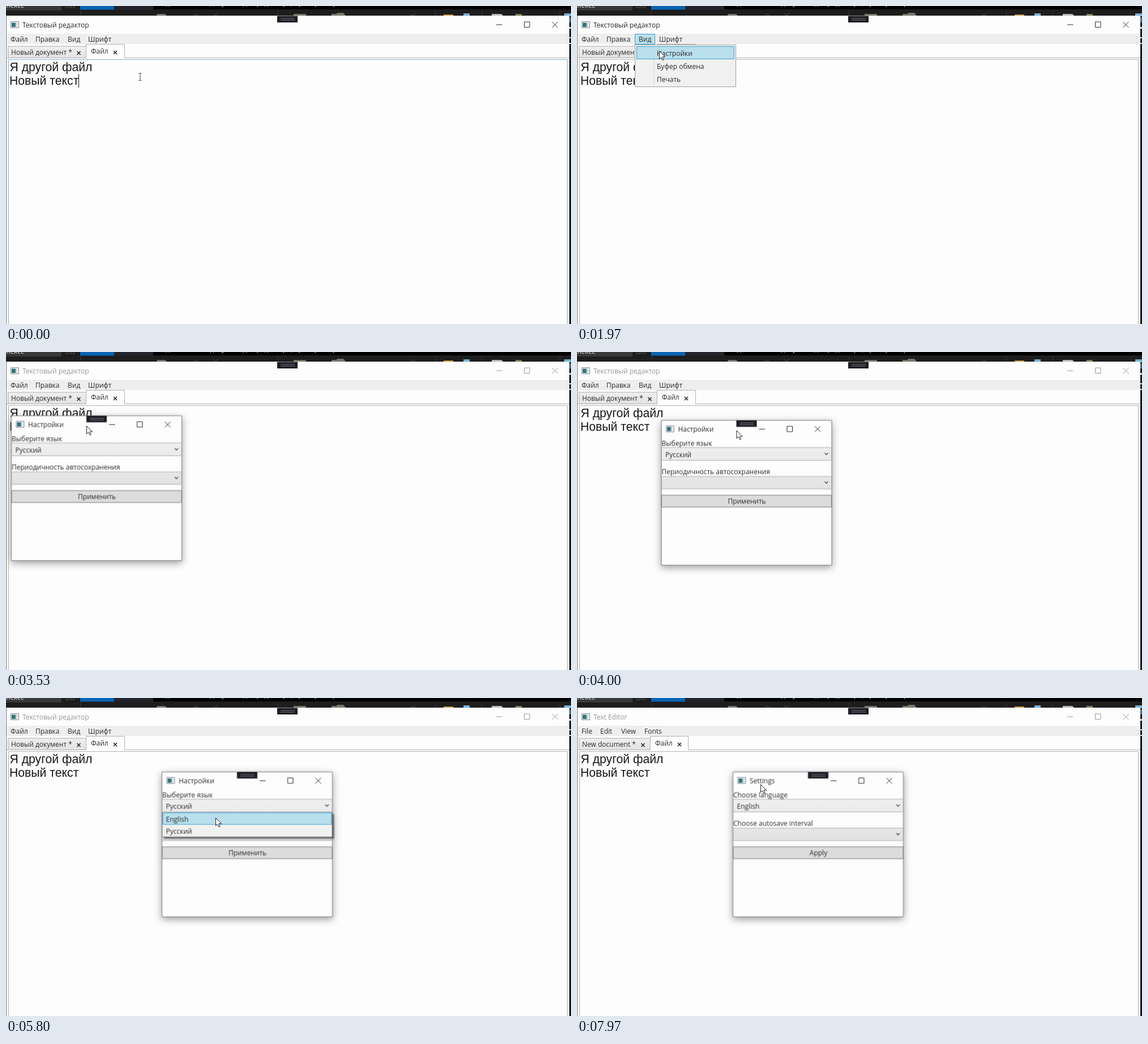
An HTML page that plays this animation: 998 px wide and 561 px high, repeating every 8000 ms.

```html
<!DOCTYPE html>
<html lang="ru">
<head>
<meta charset="utf-8">
<title>Текстовый редактор</title>
<style>
html, body { margin: 0; width: 100%; height: 100%; overflow: hidden; background: #1d1d1d; }
svg { display: block; width: 100vw; height: 100vh; }
text { font: 12px "Open Sans", "Noto Sans", sans-serif; fill: #2b2b2b; white-space: pre; }
.body text { font: 21.2px "Liberation Sans", Arial, sans-serif; fill: #181818; }
.line { fill: none; stroke: currentColor; }
.title text { fill: currentColor; }
.box { fill: url(#face); stroke: #acacb4; }
.hot { fill: #b9dfec; stroke: #3ba3cf; }

/* Switches: 1% = 80 ms */
.t { animation: 8s step-end infinite; }
@keyframes caret { 0% { opacity: 1 } 6.6% { opacity: 0 } 13.2% { opacity: 1 } 18.5% { opacity: 0 } }
@keyframes focus { 0% { stroke: #7db3dc } 18.5% { stroke: #b4b4a6 } }
@keyframes active { 0% { color: #2b2b2b } 32.5% { color: #989898 } }
@keyframes beam { 0% { opacity: 1 } 9.4% { opacity: 0 } }
@keyframes arrow { 0% { opacity: 0 } 9.4% { opacity: 1 } }
@keyframes menu { 0% { opacity: 0 } 18.5% { opacity: 1 } 31.8% { opacity: 0 } }
@keyframes menuItem { 0% { opacity: 0 } 22% { opacity: 1 } }
@keyframes grip { 0% { opacity: 0 } 36.3% { opacity: 1 } }
@keyframes comboHover { 0% { opacity: 0 } 61.8% { opacity: 1 } 69% { opacity: 0 } }
@keyframes popup { 0% { opacity: 0 } 62.6% { opacity: 1 } 76.6% { opacity: 0 } }
@keyframes choice { 0% { transform: translateY(21px) } 69% { transform: none } }
@keyframes before { 0% { opacity: 1 } 76.6% { opacity: 0 } }
@keyframes after { 0% { opacity: 0 } 76.6% { opacity: 1 } }
@keyframes applyHover { 0% { opacity: 0 } 84.3% { opacity: 1 } 98.4% { opacity: 0 } }
@keyframes ru { 0% { opacity: 1 } 88.6% { opacity: 0 } }
@keyframes en { 0% { opacity: 0 } 88.6% { opacity: 1 } }

/* Motion */
#pointer { animation: pointer 8s ease-in-out infinite; }
@keyframes pointer {
  0%, 3.75% { transform: translate(237px, 125px) }
  15%, 18.75% { transform: translate(125px, 60px) }
  23.75%, 42.1% { transform: translate(145px, 79px) }
  44.1% { transform: translate(142px, 130px) }
  47.5% { transform: translate(142px, 130px); animation-timing-function: ease-in }
  50% { transform: translate(281px, 138px); animation-timing-function: ease-out }
  55.6%, 58.1% { transform: translate(408px, 148px) }
  62.5%, 68.4% { transform: translate(374px, 200px) }
  72.3%, 80.9% { transform: translate(370px, 211px) }
  85.6%, 97.6% { transform: translate(368px, 269px) }
  99.5%, 100% { transform: translate(324px, 152px) }
}
#dialog { animation: drag 8s infinite, appear 8s linear infinite; filter: drop-shadow(0 4px 7px rgba(0, 0, 0, .38)); }
@keyframes drag {
  0%, 47.5% { transform: translate(9.5px, 112.5px); animation-timing-function: ease-in }
  50% { transform: translate(148.5px, 120.5px); animation-timing-function: ease-out }
  55.6%, 100% { transform: translate(275.5px, 130.5px) }
}
@keyframes appear { 0%, 32.5% { opacity: 0 } 35.6%, 100% { opacity: 1 } }
#list { animation: slide 8s ease-out infinite; filter: drop-shadow(3px 3px 1px rgba(30, 30, 40, .6)); }
@keyframes slide { 0%, 62.7% { transform: translateY(-44px) } 64.8%, 100% { transform: none } }
</style>
</head>
<body>
<svg viewBox="0 0 998 561" preserveAspectRatio="none">
  <defs>
    <linearGradient id="face" x2="0" y2="1"><stop stop-color="#efefef"/><stop offset="1" stop-color="#e3e3e4"/></linearGradient>
    <linearGradient id="faceHot" x2="0" y2="1"><stop stop-color="#ebf4fc"/><stop offset="1" stop-color="#d9ebfb"/></linearGradient>
    <clipPath id="below"><path d="M-4 71h320v60h-320z"/></clipPath>
    <path id="controls" class="line" d="M0 5.5h10.5M49.5 .5h9.5v9.5h-9.5zM98.5 .5l10 10m0-10l-10 10"/>
    <path id="chevron" d="M-3 -1.5l3 3l3-3" fill="none" stroke="#444" stroke-width="1.3"/>
    <path id="cross" d="M-3 -3l6 6m0-6l-6 6" stroke="#222" stroke-width="1.5"/>
    <g id="icon">
      <path d="M.5 .5h14v11h-14z" fill="#e4e8ea" stroke="#8c929c"/>
      <path d="M2 2.5h6v7.500h-6z" fill="#2f756f"/>
      <path d="M8 2.500h2v7.500h-2z" fill="#79a9c0"/>
    </g>
    <g id="handle">
      <path d="M0 0h36v11.500h-36z" fill="#1c1c22"/>
      <path d="M6 4.500h25M6 7.500h25" stroke="#777780"/>
    </g>
  </defs>

  <!-- Desktop behind the window -->
  <path d="M0 0h998v561h-998z" fill="#1d1d1d"/>
  <path d="M0 0h98v8h-98z" fill="#383838"/>
  <path d="M131 0h60v6.500h-60z" fill="#0864b4"/>
  <path d="M191 0h69v6.500h-69z" fill="#23242b"/>
  <path d="M260 0h738v6h-738z" fill="#000"/>
  <path d="M105.500 0v3h6v-3m3 0v3h6v-3" class="line" color="#555"/>
  <path d="M131.500 7v10M480.500 9v8M758.500 9v8M840.500 9v8M978.500 9v8" stroke="#444" stroke-dasharray="2 1"/>
  <text x="-7" y="3" style="fill:#e8e8e8">плексе</text>
  <text x="262" y="-1" style="fill:#d0d0d0">Создайте новый документ для редактора, проверьте файл</text>
  <path d="M267 14h14l3 3h-18zM508 14h22v3h-22zM575 14h8l3-2h10l4 5h-25z" fill="#77776c"/>
  <path d="M332 17l4-3 4 3M366 13l4 4 4-4M714 14l4 3 5-3" class="line" color="#554f66"/>
  <path d="M773 15h17v2h-17z" fill="#c99a45"/>
  <path d="M808 13h11v4h-11zM986 13h12v5h-12z" fill="#79b3d8"/>
  <path d="M858 14h17l3 3h-20z" fill="#bdbdbd"/>
  <path d="M900 14h11v3h-11z" fill="#87805a"/>

  <!-- Editor window -->
  <path d="M0 17h995.500v544h-995.500z" fill="#fdfdfd"/>
  <path d="M0 49h995v18h-995z" fill="#eeeeef"/>
  <path d="M.5 17v544" stroke="#7c7c7c"/>
  <path d="M995 18h3v543h-3z" fill="#16161a"/>
  <path d="M995 37h3v3h-3zM995 55h3v2h-3zM995 65h3v2h-3z" fill="#ddd"/>
  <path d="M995 20h3v9h-3z" fill="#456c8b"/>
  <use href="#icon" x="8" y="27"/>
  <use href="#handle" x="479" y="17.500"/>
  <g class="t title" style="animation-name:active">
    <use href="#controls" x="866" y="27.500"/>
    <text class="t" style="animation-name:ru" x="29" y="38">Текстовый редактор</text>
    <text class="t" style="animation-name:en" x="29" y="38">Text Editor</text>
  </g>
  <path d="M1 91.500h994" stroke="#b4b4b4"/>
  <g class="t" style="animation-name:menu"><path class="hot" d="M102.500 49.500h35v18h-35z"/></g>
  <g class="t" style="animation-name:ru">
    <text x="8" y="63">Файл</text><text x="52" y="63">Правка</text><text x="109" y="63">Вид</text><text x="145" y="63">Шрифт</text>
    <path class="box" d="M3.500 91.500v-20.500h138v20.500z"/>
    <path d="M141.500 92v-24.500h68v24.500" fill="#fdfdfd" stroke="#b4b4b4"/>
    <text x="9" y="86">Новый документ *</text><text x="150" y="84">Файл</text>
    <use href="#cross" x="128.500" y="83"/><use href="#cross" x="193" y="82"/>
  </g>
  <g class="t" style="animation-name:en">
    <text x="8" y="63">File</text><text x="41" y="63">Edit</text><text x="78" y="63">View</text><text x="119" y="63">Fonts</text>
    <path class="box" d="M3.500 91.500v-20.500h126v20.500z"/>
    <path d="M129.500 92v-24.500h67v24.500" fill="#fdfdfd" stroke="#b4b4b4"/>
    <text x="9" y="86">New document *</text><text x="138" y="84">Файл</text>
    <use href="#cross" x="116.500" y="83"/><use href="#cross" x="181" y="82"/>
  </g>
  <path class="t" style="animation-name:focus" d="M4.500 562v-467.500h987v467.500" fill="none"/>
  <g class="body">
    <text x="6.500" y="115">Я другой файл</text>
    <text x="6" y="139">Новый текст</text>
    <path class="t" style="animation-name:caret" d="M128.500 120v24" stroke="#111"/>
  </g>

  <!-- View menu -->
  <g class="t" style="animation-name:menu">
    <path d="M102.500 68.500h178v74h-178z" fill="#f0f0f0" stroke="#a0a0a0"/>
    <path d="M135.500 70v71" stroke="#d9d9d9"/>
    <path class="t hot" style="animation-name:menuItem" d="M105.500 71.500h172v22h-172z"/>
    <text x="141" y="87.500">Настройки</text><text x="141" y="110.500">Буфер обмена</text><text x="141" y="133.500">Печать</text>
  </g>

  <!-- Settings dialog -->
  <g id="dialog">
    <path d="M0 0h301v255.500h-301z" fill="#fdfdfd" stroke="#777785"/>
    <use href="#icon" x="8" y="9"/>
    <g color="#222"><use href="#controls" x="172.500" y="10"/></g>
    <g class="t" style="animation-name:grip"><use href="#handle" x="132.500"/></g>
    <path class="box" d="M.5 48h300v22.500h-300zM.5 99h300v22h-300z"/>
    <path class="t" style="animation-name:comboHover" d="M.5 48h300v22.500h-300z" fill="url(#faceHot)" stroke="#7eb4e4"/>
    <use href="#chevron" x="291.500" y="59"/><use href="#chevron" x="291.500" y="109.500"/>
    <path d="M.5 132h300v21h-300z" fill="#dcdcdc" stroke="#777"/>
    <path class="t" style="animation-name:applyHover" d="M.5 132h300v21h-300z" fill="#bee6fd" stroke="#3c7fb1"/>
    <g class="t" style="animation-name:ru">
      <text x="29.500" y="20">Настройки</text><text x=".5" y="45">Выберите язык</text>
      <text x=".5" y="95">Периодичность автосохранения</text>
      <text x="151" y="147" text-anchor="middle">Применить</text>
    </g>
    <g class="t" style="animation-name:en">
      <text x="29.500" y="20">Settings</text><text x=".5" y="45">Choose language</text>
      <text x=".5" y="95">Choose autosave interval</text>
      <text x="151" y="147" text-anchor="middle">Apply</text>
    </g>
    <text class="t" style="animation-name:before" x="7" y="65">Русский</text>
    <text class="t" style="animation-name:after" x="7" y="65">English</text>
    <g class="t" style="animation-name:popup" clip-path="url(#below)">
      <g id="list">
        <path d="M.5 71h300v43.500h-300z" fill="#f1f1f0" stroke="#85858a"/>
        <path class="t hot" style="animation-name:choice" d="M1.500 72h298v20.500h-298z"/>
        <text x="7" y="87.500">English</text><text x="7" y="108.500">Русский</text>
      </g>
    </g>
  </g>

  <g id="pointer">
    <path class="t" style="animation-name:beam" d="M-2.500 -6.500h2l.5 .5l.5-.5h2M0 -6v12M-2.500 6.500h2l.5-.5l.5 .5h2" fill="none" stroke="#444"/>
    <path class="t" style="animation-name:arrow" d="M.5 .5v14l3.200-3l2.300 5l2.200-1l-2.200-4.800h4.500z" fill="#fff" stroke="#222"/>
  </g>
</svg>
</body>
</html>
```
